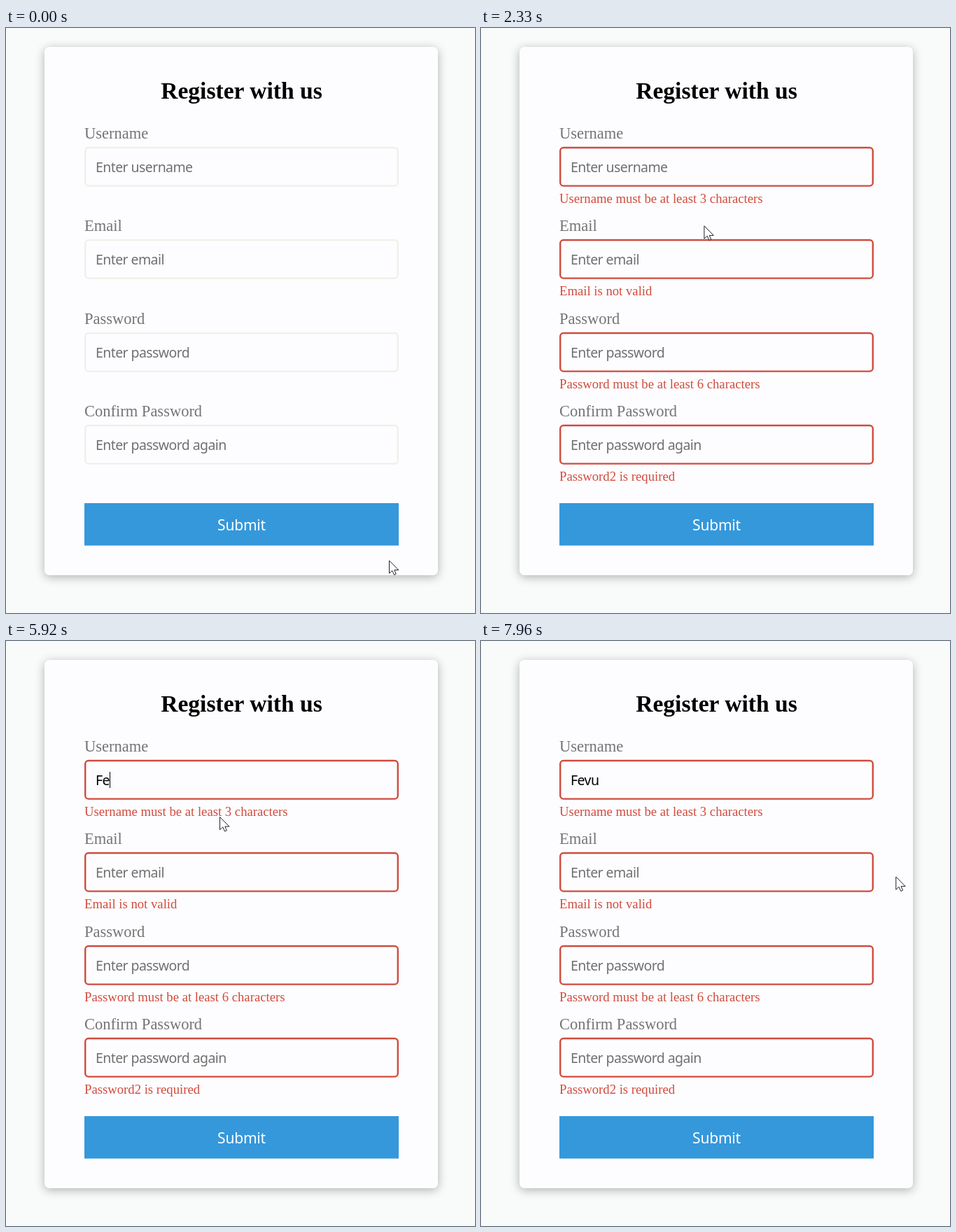
These frames come from a looping animation (670 px wide and 836 px high, 8 s). An HTML page:

```html
<!DOCTYPE html>
<html lang="en">
<head>
<meta charset="utf-8">
<title>Register form</title>
<style>
  html, body { margin: 0; width: 670px; height: 836px; overflow: hidden; background: #f9fbfa; }
  #card { position: absolute; left: 55px; top: 27px; width: 562px; height: 755px; border-radius: 7px;
    background: #fdfdff; box-shadow: 0 2.8px 14px rgba(0, 0, 0, .3); }
  svg { position: absolute; left: 0; top: 0; }
  text { font-family: "Liberation Serif", serif; white-space: pre; }
  .title { font-size: 33.6px; font-weight: bold; text-anchor: middle; }
  .label { font-size: 22.5px; fill: #747474; }
  .error { font-size: 18.7px; fill: #d14b3c; visibility: hidden; }
  .input, .button, .option { font-family: "Noto Sans", sans-serif; letter-spacing: -.03em; }
  .input { font-size: 19.5px; fill: #707070; }
  .button { font-size: 21px; letter-spacing: -.01em; fill: #fff; text-anchor: middle; }
  .option { font-size: 16.5px; }
  .box { fill: none; stroke: #f0f0ea; stroke-width: 2.4px; }
  .invalid .box { stroke: #cf4c3e; }
  .invalid .error { visibility: visible; }
</style>
</head>
<body>
<div id="card"></div>
<svg width="670" height="836">
  <text class="title" x="336.5" y="100.5">Register with us</text>
  <g id="form"></g>
  <rect x="112" y="679" width="449" height="60.6" fill="#3498db"/>
  <text class="button" x="336.5" y="718">Submit</text>
  <rect id="caret" y="187" width="1" height="23"/>
  <g id="menu">
    <path d="M118 256.2H562.8V232" fill="none" stroke="#8a8a8a" stroke-width="2"/>
    <rect id="row" x="112.5" y="226.5" width="449" height="29" stroke="#9a9a9a"/>
    <text class="option" x="120" y="248">Fevu</text>
  </g>
  <g id="cursor" stroke-linejoin="round">
    <path id="arrow" d="M0 0V18.3L4.3 14.4 7 20.5 9.8 19.3 7.3 13.6H13.4Z" fill="#fff" stroke="#222"/>
    <path id="hand" d="M-1.8 1.6Q0-.8 1.9 1.6V9.5Q4 7.8 5.6 10 7.6 8.8 8.6 11 11 10.4 11.4 13V18Q11 20.5 9.6 22V24.6H-.6V22.6L-7.4 14.6Q-7.6 11.6-4.4 12.6L-1.8 15Z" fill="#fff" stroke="#111"/>
    <path id="beam" d="M-4-9.5H-1L1-8 3-9.5H6M1-8V9M-4 10.5H-1L1 9 3 10.5H6" fill="none" stroke="#111" stroke-width="1.7"/>
  </g>
</svg>
<script>
const LOOP = 8000;
const $ = id => document.getElementById(id);
const show = (el, on) => el.style.display = on ? '' : 'none';

const fields = [
  ['Username', 'Enter username', 'Username must be at least 3 characters'],
  ['Email', 'Enter email', 'Email is not valid'],
  ['Password', 'Enter password', 'Password must be at least 6 characters'],
  ['Confirm Password', 'Enter password again', 'Password2 is required'],
];
const PITCH = 132.25;
$('form').innerHTML = fields.map(([label, hint, error], i) => `
  <g transform="translate(112 ${Math.round(170 + i * PITCH)})">
    <text class="label" y="-12">${label}</text>
    <rect class="box" x="1.2" y="1" width="446.6" height="54.6" rx="4.6"/>
    <text class="input" x="16" y="36">${hint}</text>
    <text class="error" y="80">${error}</text>
  </g>`).join('');
const nameText = document.querySelector('.input');

// Pointer stops: time, x, y
const path = [
  [0, 547.5, 761], [90, 547.5, 761], [790, 441, 695], [1790, 441, 695], [2500, 298.5, 214],
  [2640, 298.5, 214], [2710, 298.5, 218], [2930, 298.5, 218], [3250, 305.5, 251.5],
  [6710, 305.5, 251.5], [7200, 647, 440], [7420, 641.5, 415.5], [7540, 637, 400],
  [7960, 592.8, 337], [LOOP, 592.8, 337],
];
const typed = [[0, ''], [3830, 'F'], [4050, 'Fe'], [4830, 'Fel'], [5630, 'Fe'], [6210, 'Fev'], [6420, 'Fevu']];
const caretTimes = [[2480, 3010], [3540, 4580], [4830, 5170], [5630, 6950], [7400, 7930]];
const menuTimes = [[3870, 4830], [5960, 7580]];

const within = (spans, t) => spans.some(([from, to]) => t >= from && t < to);

function pointerAt(t) {
  const i = path.findIndex(stop => stop[0] > t);
  const [t0, x0, y0] = path[i - 1], [t1, x1, y1] = path[i];
  const u = (t - t0) / (t1 - t0), k = u * u * (3 - 2 * u);
  return [x0 + (x1 - x0) * k, y0 + (y1 - y0) * k];
}

function pointerKind(x, y, t) {
  if (x < 112 || x > 561) return 'arrow';
  if (y > 679 && y < 740) return 'hand';
  const inField = y > 170 && y < 624 && (y - 170) % PITCH < 57;
  const onError = t < 3870 && x < 403 && y > 233 && y < 256;
  return inField || onError ? 'beam' : 'arrow';
}

function draw(t) {
  $('form').classList.toggle('invalid', t >= 1080);

  const value = typed.findLast(([from]) => t >= from)[1];
  nameText.textContent = value || fields[0][1];
  nameText.style.fill = value ? '#000' : '';
  $('caret').setAttribute('x', Math.round(128 + (value ? nameText.getComputedTextLength() : 0)));
  show($('caret'), within(caretTimes, t));

  const [x, y] = pointerAt(t);
  const kind = pointerKind(x, y, t);
  $('cursor').setAttribute('transform', `translate(${x} ${y})`);
  for (const id of ['arrow', 'hand', 'beam']) show($(id), id === kind);

  show($('menu'), within(menuTimes, t));
  $('row').setAttribute('fill', y < 256 && x < 562 ? '#ececec' : '#fdfdff');
}

function tick(now) {
  draw(now % LOOP);
  requestAnimationFrame(tick);
}
draw(0);
requestAnimationFrame(tick);
</script>
</body>
</html>
```
